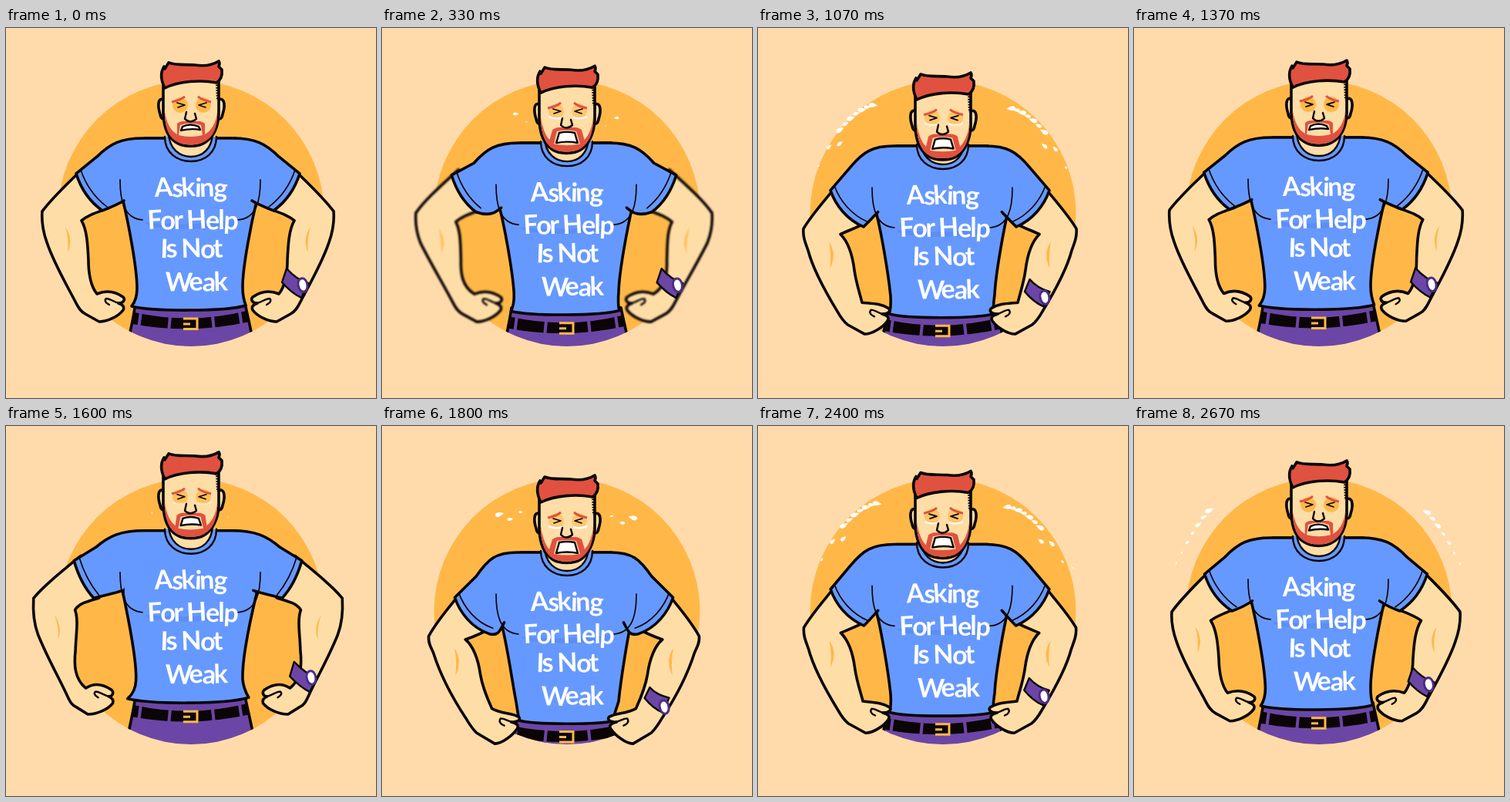
Write an HTML page that moves like this. It is 480 px wide and 480 px high and loops after 2710 ms.

```html
<!DOCTYPE html>
<html lang="en">
<head>
<meta charset="utf-8">
<title>Asking For Help Is Not Weak</title>
<style>
html, body { margin: 0; width: 100%; height: 100%; overflow: hidden; background: #ffdbac; }
svg { display: block; width: 100vw; height: 100vh; }
.line { fill: none; stroke: #0b0506; stroke-linecap: round; stroke-linejoin: round; }
.w4 { stroke-width: 3.6; }
.w3 { stroke-width: 2.4; }
.w2 { stroke-width: 1.7; }
.line.skin { fill: #ffdda6; }
.line.blue { fill: #6699ff; }
.line.red, .red { fill: #e0523f; }
.line.white { fill: #fff; }
.line.purple { fill: #6b46a6; }
.gold { fill: #ffb848; }
text { font: 700 34px Lato, "Open Sans", sans-serif; letter-spacing: -1.7px; fill: #fff; }
</style>
</head>
<body>
<svg viewBox="0 0 480 480">
  <defs><clipPath id="disc"><circle cx="240" cy="240.500" r="172.500"/></clipPath></defs>
  <circle class="gold" cx="240" cy="240.500" r="172.500"/>
  <g id="tears" fill="#fff"></g>

  <g clip-path="url(#disc)">
    <g id="pants">
      <path class="line w4 purple" d="M168 355C166 370 163 384 159 402V440H320V402C317 386 313 370 310 355Z"/>
      <path d="M167 367Q240 383 312 365L316 379Q240 396 164 382Z" fill="#0b0506"/>
      <path d="M175 366L172 388M213 372L211 392M268 372L270 391M303 366L306 386" stroke="#6b46a6" stroke-width="4"/>
      <path d="M230 375H248V388.500H230M230 382H239" fill="none" stroke="#ffb848" stroke-width="3"/>
    </g>
  </g>

  <path id="torso" class="line w4 blue"/>

  <g id="side">
    <g id="armBox">
      <path id="arm" class="line w4 skin"/>
      <path id="knuckle" class="line w3"/>
      <path id="shine" class="gold"/>
    </g>
    <path id="sleeve" class="line w4 blue"/>
    <path id="seam" class="line w2"/>
  </g>
  <use href="#side" transform="translate(472) scale(-1 1)"/>
  <g transform="translate(472) scale(-1 1)">
    <path id="strap" class="line w3 purple"/>
    <path id="dial" class="line white" style="stroke:#4b2c86;stroke-width:3"/>
  </g>

  <g id="chest">
    <path d="M180 252Q240 258 299 249Q298 260 276 259Q240 263 203 259Q184 259 180 252Z" fill="#5d8ef4"/>
    <path class="line w2" d="M148 197C148 222 152 247 177 249M330 197C330 222 326 247 301 249"/>
    <path class="line w3 blue" d="M206 141C206 162 222 173 240 173C258 173 273 162 273 141"/>
    <path class="line w3 skin" d="M211 137C212 157 225 167 240 167C255 167 267 157 268 137"/>
    <text x="193" y="219" rotate="-3 2 -4 2 -2 3">Asking</text>
    <text x="184" y="261" rotate="-3 2 -2 0 -3 2 0 3">For Help</text>
    <text x="200" y="298" rotate="2 -3 0 -2 3 -3">Is Not</text>
    <text x="206" y="341" rotate="2 -3 3 -2">Weak</text>
  </g>

  <g id="head">
    <path class="line w4 skin" d="M205 93C196 89 197 103 200 112C201 118 204 119 207 117M275 93C285 89 284 103 281 112C280 118 277 119 274 117"/>
    <path id="face" class="line w4 skin"/>
    <path id="beard" class="red" fill-rule="evenodd"/>
    <path d="M274 70L275 94" stroke="#0b0506" stroke-width="4" stroke-dasharray="1.800 1.600"/>
    <g id="look">
      <g id="bags" class="gold"><circle cx="226" cy="100" r="10"/><circle cx="256" cy="100" r="10"/></g>
      <path d="M215 96Q226 94 232 89M249 89Q255 94 266 96" fill="none" stroke="#e0523f" stroke-width="3"/>
      <path class="line w2" d="M222 97L232 100L223 103M260 97L250 100L259 103"/>
      <path id="wet" d="M216 107Q225 111 234 108M248 108Q257 111 266 107" fill="none" stroke="#fff" stroke-width="2.500"/>
      <path class="line w3" d="M234 109L232 118Q239 125 247 118L245 111"/>
    </g>
    <path id="mouth" class="line w3 white"/>
    <path class="line w4 red" d="M206 78C201 68 200 58 205 50L206 53L211 45C220 49 232 47 245 48C258 50 268 48 276 43C278 46 277 48 276 50L280 54C281 62 278 68 273 71C252 67 224 69 206 78Z"/>
  </g>
</svg>
<script>
const CYCLE = 1355;
// time, body y, head y, elbow x/y, hand x/y, mouth
const KEYS = [
  [0, 0, 0, 0, 0, 0, 0, 0],
  [100, -6, -6, -.45, -.35, -.3, -.2, 0],
  [200, -9, -10, -.72, -.5, -.45, -.35, .2],
  [250, -7, -9, -.7, -.45, -.42, -.3, .5],
  [330, 6, 6, -.2, .05, .05, 0, .9],
  [400, 18, 19, .6, .8, .55, .9, 1],
  [445, 21, 21, .85, 1.08, .72, 1.35, 1],
  [530, 18, 21, .95, 1.1, .9, 1.4, 1],
  [730, 14, 19, 1, 1, 1, 1.05, 1],
  [775, 14, 19, 1, 1, .83, 1.2, 1],
  [1070, 10, 15, .75, .7, .5, .7, .8],
  [1315, 2, 2, .13, .1, .1, .08, .05]
];
const $ = id => document.getElementById(id);
const shift = (id, y) => $(id).setAttribute('transform', `translate(0 ${y.toFixed(2)})`);
const draw = (id, d) => $(id).setAttribute('d', d);

// Blend two paths of the same structure, x and y separately
function mix(a, b, kx, ky = kx) {
  const to = b.match(/-?[\d.]+/g);
  let i = 0;
  return a.replace(/-?[\d.]+/g, n => {
    const k = i % 2 ? ky : kx;
    return (+n + (to[i++] - n) * k).toFixed(2);
  });
}

function key(i) {
  const n = KEYS.length, k = KEYS[(i + n) % n];
  return [k[0] + Math.floor(i / n) * CYCLE, ...k.slice(1)];
}

// Smooth curve through the keys, without overshoot
function pose(t) {
  t = (t % CYCLE + CYCLE) % CYCLE;
  let i = KEYS.length - 1;
  while (KEYS[i][0] > t) i--;
  const [p, a, b, q] = [key(i - 1), key(i), key(i + 1), key(i + 2)];
  const h = b[0] - a[0], u = (t - a[0]) / h;
  const slope = (l, m, r, c) => {
    const s = (m[c] - l[c]) / (m[0] - l[0]), e = (r[c] - m[c]) / (r[0] - m[0]);
    return s * e <= 0 ? 0 : 2 * s * e / (s + e);
  };
  return a.slice(1).map((v, j) => {
    const c = j + 1, d = b[c] - v;
    return v + d * u * u * (3 - 2 * u) + h * u * (1 - u) *
      (slope(p, a, b, c) * (1 - u) - slope(a, b, q, c) * u);
  });
}

const launch = i => i < 6 ? 200 + 75 * i : 635 + 34 * (i - 6);
const drops = [-1, 1].flatMap(dir => Array.from({ length: 13 }, (_, i) => {
  const el = document.createElementNS('http://www.w3.org/2000/svg', 'path');
  el.setAttribute('d', 'M-7 0Q0 -4 3 -3.500Q7 -3 7 0Q7 3 3 3.500Q0 4 -7 0Z');
  $('tears').append(el);
  return { el, dir, i, at: launch(i) + (dir > 0 ? 12 : 0) };
}));

function cry(t) {
  for (const { el, dir, at, i } of drops) {
    const s = t - at, live = s > 0 && s < 690;
    el.style.display = live ? '' : 'none';
    if (!live) continue;
    const early = i < 6, v = early ? .185 : .21, g = .000216;
    const lift = .055 + Math.max(0, at - 640) * .0003;
    const x = 240 + dir * (42 + v * s);
    const y = 115 + (early ? i % 2 * 9 : 0) + (dir > 0 ? 5 : 0) - lift * s + g * s * s;
    const turn = Math.atan2(2 * g * s - lift, dir * v) * 180 / Math.PI;
    const size = Math.min(1, s / 200) * Math.min(1, (760 - s) / 270) * (i % 2 ? .65 : .82);
    el.setAttribute('transform', `translate(${x} ${y}) rotate(${turn}) scale(${size})`);
  }
}

function render(time) {
  const t = time % CYCLE;
  const [by, head, ex, ey, hx, hy, m] = pose(t);
  const k = by / 15;
  shift('chest', by);
  shift('pants', by - k + 2);
  shift('head', head);
  shift('look', 2 * m);

  draw('torso', mix(
    'M206 143L180 143L152 162L152 225C158 250 170 310 170 338C170 348 167 356 163 361C190 368 285 368 311 360C308 352 307 346 307 336C307 308 319 250 325 225L325 162L298 143L273 143',
    'M206 158L180 158L152 177L152 240C160 265 169 325 173 353C174 363 174 371 174 376C194 382 282 382 303 376C303 367 305 361 307 351C309 323 319 265 325 240L325 177L298 158L273 158', k));
  draw('arm',
    mix('M100 182C80 202 60 220 47 238C46 252 48 264 53 278',
        'M104 212C92 230 76 247 63 270C62 279 66 285 69 293', ex, ey) +
    mix('C62 305 78 332 90 355C94 363 97 368 103 371L121 381C132 381 146 374 152 366C154 362 152 359 146 357C153 357 155 352 152 349C142 342 130 340 118 345',
        'C82 320 100 350 115 372C120 380 124 386 130 391L156 404C165 404 179 394 184 386C187 382 185 379 176 377C187 377 190 373 187 370C178 364 165 365 152 361', hx, hy) +
    mix('C110 335 107 318 107 300C106 280 105 262 98 250C106 243 116 240 132 234',
        'C140 350 134 336 131 320C128 300 120 283 110 275C122 271 132 267 148 258', ex, ey));
  draw('knuckle', mix('M147 357C140 356 136 351 130 351C127 354 130 357 134 359',
    'M177 377C172 376 168 372 163 372C160 376 163 379 168 381', hx, hy));
  draw('shine', mix('M77 258Q88 274 80 291Q82 274 77 258Z', 'M97 286Q108 302 98 321Q100 302 97 286Z', ex, ey));
  draw('sleeve',
    mix('M206 143L178 143C149 143 135 150 118 167', 'M206 158L176 158C148 158 137 166 121 187', k) +
    mix('L91 189C97 208 108 225 125 237', 'L95 220C102 240 118 259 141 267', ex, ey) +
    mix('C135 233 145 229 153 224', 'C147 262 151 254 157 246', k));
  draw('seam', mix('M97 184C103 202 114 219 131 232', 'M100 214C107 233 123 252 146 260', ex, ey));
  draw('strap', mix('M108 312C100 321 91 328 80 331L89 350C99 345 107 338 114 330Z',
    'M131 332C125 340 117 344 107 347L115 366C124 362 132 355 138 347Z', hx, hy));
  draw('dial', mix('M89 325C97 328 92 344 85 342C78 340 81 323 89 325Z',
    'M115 348C123 351 118 367 111 365C104 363 107 346 115 348Z', hx, hy));

  draw('face', mix('M204 65L204 112C205 132 212 143 220 148C230 155 249 155 259 148C268 142 275 130 276 112L276 65Z',
    'M204 65L204 114C205 134 212 146 221 152C230 158 249 158 258 152C267 146 275 132 276 114L276 65Z', m));
  draw('beard', mix('M206 109C208 122 213 133 222 138L222 124C228 119 234 122 239 121C246 122 252 119 258 124L258 138C267 133 273 122 274 109C275 130 268 142 258 147C249 153 230 153 221 147C211 141 206 130 206 109ZM226 126L224 139Q239 143 255 139L253 126Q239 121 226 126Z',
    'M206 109C208 122 211 132 217 139L221 126C228 121 234 124 239 123C246 124 252 121 259 126L263 139C269 132 273 122 274 109C275 132 267 145 257 151C249 156 230 156 222 151C212 145 206 132 206 109ZM227 128L223 145Q239 148 257 145L252 128Q239 126 227 128Z', m));
  draw('mouth', mix('M229 128Q239 123 250 128L252 132Q240 130 227 133Z',
    'M230 130Q240 128 250 130L254 144Q240 141 226 144Z', m));
  $('bags').style.opacity = 1 - .45 * m;
  $('wet').style.opacity = m;

  const was = pose(t - 16);
  const speed = Math.hypot((hx - was[4]) * 35, (hy - was[5]) * 23);
  $('armBox').style.filter = speed > .8 ? `blur(${Math.min(1, speed * .25).toFixed(2)}px)` : 'none';
  cry(t);
}

const start = performance.now();
function tick() {
  render((performance.now() - start) % (2 * CYCLE));
  requestAnimationFrame(tick);
}
render(0);
requestAnimationFrame(tick);
</script>
</body>
</html>
```
